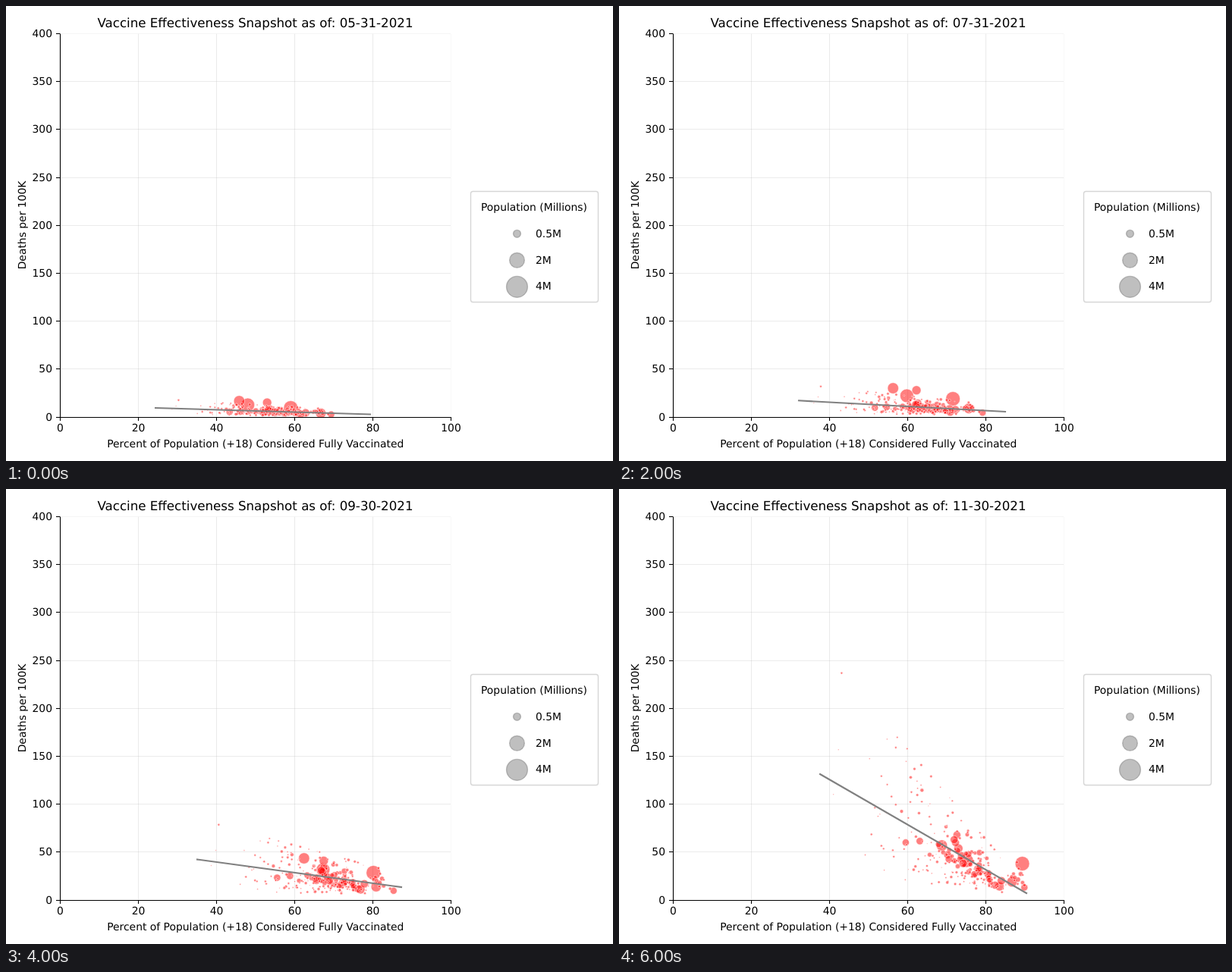
These frames come from a looping animation (800 px wide and 600 px high, 7 s). An HTML page:

```html
<!DOCTYPE html>
<html lang="en">
<head>
<meta charset="utf-8">
<title>Vaccine Effectiveness Snapshot</title>
<style>
  html, body { margin: 0; width: 100%; height: 100%; overflow: hidden; background: #fff; }
  svg { display: block; font: 13.89px "DejaVu Sans", sans-serif; text-rendering: geometricPrecision; }
  #title { font-size: 16.67px; }
  .mid { text-anchor: middle; }
  .end { text-anchor: end; }
  .axis { stroke: #000; stroke-width: 1.1; }
  .grid { stroke: #b0b0b0; stroke-opacity: .25; stroke-width: 1.1; }
  #dots { fill: red; fill-opacity: .5; stroke: #fff; stroke-opacity: .5; }
  #key { fill: gray; fill-opacity: .5; stroke: gray; stroke-opacity: .5; stroke-width: 1.4; }
  #trend { stroke: gray; stroke-width: 2.1; stroke-linecap: square; }
</style>
</head>
<body>
<svg width="800" height="600" viewBox="0 0 800 600">
  <clipPath id="plot"><rect x="71" y="36.5" width="515.3" height="505.5"/></clipPath>
  <g id="grid" clip-path="url(#plot)"></g>
  <g id="dots" clip-path="url(#plot)"></g>
  <line id="trend"/>
  <g id="axes"></g>
  <text id="title" class="mid" x="328.5" y="28"></text>
  <text class="mid" x="328.8" y="582">Percent of Population (+18) Considered Fully Vaccinated</text>
  <text class="mid" transform="translate(25.5 289) rotate(-90)">Deaths per 100K</text>
  <rect x="612.5" y="244.5" width="168" height="146" rx="3" fill="#fff" stroke="#ccc" stroke-opacity=".8" stroke-width="1.4"/>
  <text class="mid" x="696" y="270">Population (Millions)</text>
  <g id="key"></g>
  <g id="keyText"></g>
</svg>
<script>
const $ = id => document.getElementById(id);
const line = (cls, x1, y1, x2, y2) =>
  `<line class="${cls}" x1="${x1}" y1="${y1}" x2="${x2}" y2="${y2}"/>`;
const text = (cls, x, y, s) => `<text class="${cls}" x="${x}" y="${y}">${s}</text>`;
const circle = (x, y, r) =>
  `<circle cx="${x.toFixed(2)}" cy="${y.toFixed(2)}" r="${r.toFixed(2)}"/>`;
const mix = (a, b, t) => a + (b - a) * t;
const clamp = (v, lo, hi) => Math.min(hi, Math.max(lo, v));

const LEFT = 71, RIGHT = 586, TOP = 36.5, BASE = 542;

// Trend line per month: x of both ends, then their heights above the axis
const trends = [
  [197, 480, 12, 3.5],
  [230, 499, 19.7, 4.3],
  [237, 509, 21.7, 7],
  [244, 515, 26.5, 11.7],
  [252, 521, 53.5, 17],
  [262, 528, 106, 16.5],
  [265, 537, 166, 9],
];
const LAST = trends.length - 1;

// Largest counties drift evenly along the trend (0 to 1) and upwards
const large = [
  { r: 9.5, along: [.63, .98], height: [12, 48] },
  { r: 9, along: [.43, .71], height: [16, 52] },
  { r: 7.3, along: [.39, .59], height: [21, 72] },
  { r: 6.8, along: [.77, .93], height: [5, 24] },
  { r: 6, along: [.52, .67], height: [19, 68] },
  { r: 6, along: [.66, .87], height: [6, 18] },
];

let seed = 11;
const random = () => (seed = (seed * 16807) % 2147483647) / 2147483647;
const normal = () => (random() + random() + random() + random() - 2) * 1.73;

// Every county keeps its size, its rank in the cloud and its relative death rate
const counties = Array.from({ length: 245 }, (_, i) => {
  const medium = i < 58, z = normal();
  return {
    r: medium ? 2.4 + 3 * random() ** 1.5 : .6 + (z < -1 ? 1 : 1.5) * random(),
    z: medium ? z * .7 + .35 : z * (z < 0 ? 1.4 : .95),
    rate: Math.min(2, Math.exp(normal() * (medium ? .28 : .55)) * .92),
  };
});

function drawFrame() {
  let grid = '', axes = '';
  for (let i = 0; i <= 5; i++) {
    const x = LEFT + 103 * i + .5;
    grid += line('grid', x, TOP, x, BASE);
    axes += line('axis', x, BASE, x, BASE + 5) + text('mid', x, 561, 20 * i);
  }
  for (let i = 0; i <= 8; i++) {
    const y = Math.floor(BASE - 63.19 * i) + .5;
    grid += line('grid', LEFT, y, RIGHT, y);
    axes += line('axis', LEFT - 5, y, LEFT, y) + text('end', 61, y + 4.5, 50 * i);
  }
  axes += line('axis', LEFT + .5, TOP, LEFT + .5, BASE + 1) + line('axis', LEFT, BASE + .5, RIGHT, BASE + .5);
  $('grid').innerHTML = grid;
  $('axes').innerHTML = axes;

  [.5, 2, 4].forEach((size, i) => {
    $('key').innerHTML += circle(673.5, 300.3 + 35 * i, 6.95 * Math.sqrt(size));
    $('keyText').innerHTML += text('', 698, 305 + 34.5 * i, size + 'M');
  });
}

function drawMonth(m) {
  const [x1, x2, h1, h2] = trends[m], t = m / LAST;
  const big = large.map(({ r, along, height }) =>
    circle(mix(x1, x2, mix(...along, t)), BASE - mix(...height, t), r));
  const cloud = counties.map(({ r, z, rate }) => {
    const u = clamp(mix(.54, .67, t) + mix(.13, .17, t) * z, .01, .99);
    return circle(mix(x1, x2, u), BASE - Math.max(mix(h1, h2, u), .15 * h1) * rate, r);
  });
  $('dots').innerHTML = [...big, ...cloud].join('');

  const ends = { x1, x2, y1: BASE - h1, y2: BASE - h2 };
  Object.entries(ends).forEach(([k, v]) => $('trend').setAttribute(k, v));

  const date = new Date(2021, m + 5, 0), pad = n => String(n).padStart(2, '0');
  $('title').textContent = 'Vaccine Effectiveness Snapshot as of: ' +
    `${pad(date.getMonth() + 1)}-${date.getDate()}-${date.getFullYear()}`;
}

let shown = -1;
function tick() {
  const m = Math.floor(performance.now() / 1000) % trends.length;
  if (m !== shown) drawMonth(shown = m);
  requestAnimationFrame(tick);
}

drawFrame();
tick();
</script>
</body>
</html>
```
